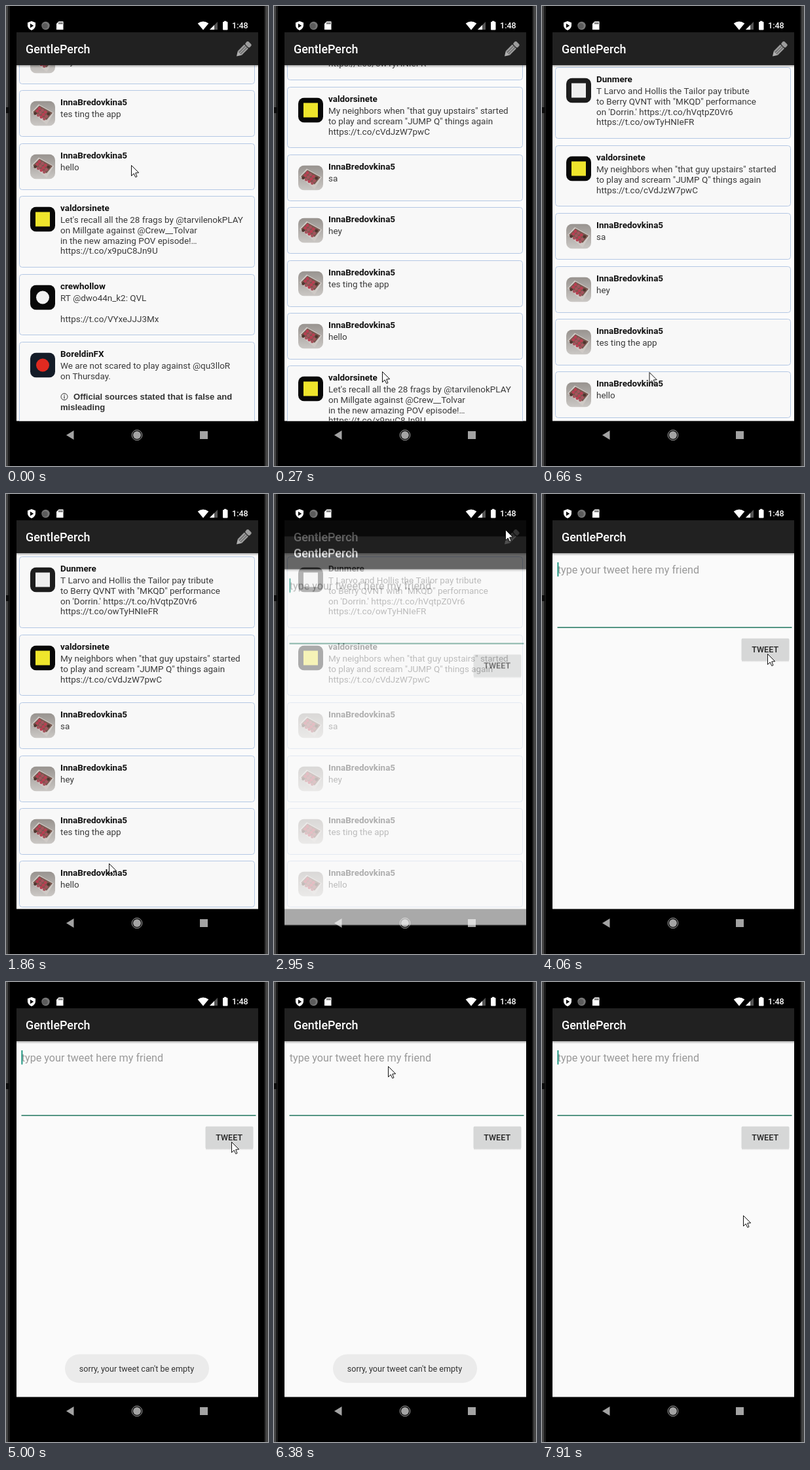
An HTML page with a canvas for the animation above (8 s loop, 400x700 px).

```html
<!DOCTYPE html>
<html lang="en">
<head>
<meta charset="utf-8">
<title>GentlePerch</title>
<style>
html, body { margin: 0; width: 100%; height: 100%; overflow: hidden; background: #000; }
canvas { display: block; width: 400px; height: 700px; }
</style>
</head>
<body>
<canvas id="stage"></canvas>
<script>
const W = 400, H = 700, LOOP = 8000;
const STEP = 135, OPEN = 2950, LEAVE = 5960;
const LINE = 15.8, GAP = 9.7;
const dpr = window.devicePixelRatio || 1;
const stage = document.getElementById('stage');
const sheet = document.createElement('canvas');
const main = prepare(stage), over = prepare(sheet);
let g = main;

// Pointer stops: time, x, y.
const STOPS = [[0, 191, 242], [270, 165, 556], [1755, 157, 562], [2280, 353, 42], [2550, 353, 54],
  [OPEN, 353, 54], [3900, 344, 243], [LEAVE, 344, 243], [6365, 174, 128], [6900, 307, 355]];

const ME = 'InnaBredovkina5', CLUB = 'valdorsinete';
const POSTS = [
  ['square', 'Dunmere', 'T Larvo and Hollis the Tailor pay tribute',
    'to Berry QVNT with "MKQD" performance', "on 'Dorrin.' https://t.co/hVqtpZ0Vr6",
    'https://t.co/owTyHNIeFR'],
  ['yellow', CLUB, 'My neighbors when "that guy upstairs" started',
    'to play and scream "JUMP Q" things again', 'https://t.co/cVdJzW7pwC'],
  ...['sa', 'hey', 'tes ting the app', 'hello'].map(line => ['photo', ME, line]),
  ['yellow', CLUB, "Let's recall all the 28 frags by @tarvilenokPLAY",
    'on Millgate against @Crew__Tolvar', 'in the new amazing POV episode!\u2026',
    'https://t.co/x9puC8Jn9U'],
  ['white', 'crewhollow', 'RT @dwo44n_k2: QVL', '', 'https://t.co/VYxeJJJ3Mx'],
  ['red', 'BoreldinFX', 'We are not scared to play against @qu3lloR', 'on Thursday.', '',
    '*Official sources stated that is false and', '*misleading']
];

function prepare(canvas) {
  canvas.width = W * dpr;
  canvas.height = H * dpr;
  const ctx = canvas.getContext('2d');
  ctx.scale(dpr, dpr);
  return ctx;
}

const ramp = (t, from, to) => Math.min(1, Math.max(0, (t - from) / (to - from)));
const pulse = (t, from, to) => Math.sin(Math.PI * ramp(t, from, to));

// The screen refreshes at a coarse, regular pace within each scene.
function snap(t) {
  const base = t < OPEN ? 0 : t < LEAVE ? OPEN : LEAVE;
  return base + Math.floor((t - base) / STEP) * STEP;
}

function rect(x, y, w, h, fill) {
  g.fillStyle = fill;
  g.fillRect(x, y, w, h);
}

function round(x, y, w, h, r, fill, stroke) {
  g.beginPath();
  g.roundRect(x, y, w, h, r);
  if (fill) { g.fillStyle = fill; g.fill(); }
  if (stroke) { g.strokeStyle = stroke; g.stroke(); }
}

function disc(x, y, r, fill) {
  g.beginPath();
  g.arc(x, y, r, 0, 7);
  g.fillStyle = fill;
  g.fill();
}

function ring(x, y, r, color) {
  g.beginPath();
  g.arc(x, y, r, 0, 7);
  g.lineWidth = 1;
  g.strokeStyle = color;
  g.stroke();
}

function poly(points, fill, stroke) {
  g.beginPath();
  for (let i = 0; i < points.length; i += 2) g.lineTo(points[i], points[i + 1]);
  g.closePath();
  g.fillStyle = fill;
  g.fill();
  if (stroke) { g.strokeStyle = stroke; g.stroke(); }
}

function text(str, x, y, size, color, weight = 400, family = 'Roboto') {
  g.font = `${weight} ${size}px ${family}, sans-serif`;
  g.fillStyle = color;
  g.fillText(str, x, y);
}

function fade(x, y, w, h, from, to) {
  const grad = g.createLinearGradient(0, y, 0, y + h);
  grad.addColorStop(0, from);
  grad.addColorStop(1, to);
  rect(x, y, w, h, grad);
}

function bezel() {
  rect(0, 0, W, H, '#000');
  rect(0, 0, 3, H, '#454545');
  rect(3, 0, 3, H, '#1a1a1a');
  rect(0, 154, 5, 9, '#0c0c0c');
  rect(394, 0, 2, H, '#1a1a1a');
  rect(396, 0, 4, H, '#454545');
}

function statusBar() {
  rect(16, 15, 369, 25, '#000');
  g.beginPath();
  g.moveTo(39, 23);
  g.lineTo(45, 25.3);
  g.lineTo(45, 30);
  g.quadraticCurveTo(44.5, 34.5, 39, 37);
  g.quadraticCurveTo(33.5, 34.5, 33, 30);
  g.lineTo(33, 25.3);
  g.fillStyle = '#fff';
  g.fill();
  poly([37, 26.8, 42.2, 30, 37, 33.2], '#000');
  disc(60.5, 30, 6.2, '#777');
  disc(59.5, 30.5, 4.3, '#5c5c5c');
  poly([80.5, 23.5, 87.5, 23.5, 87.5, 36, 77, 36, 77, 27], '#fff');
  for (let x = 80.5; x < 86; x += 2.2) rect(x, 25, 1.1, 2.6, '#000');
  g.beginPath();
  g.moveTo(301, 36.5);
  g.lineTo(292.7, 26.5);
  g.quadraticCurveTo(301, 20.5, 309.3, 26.5);
  g.fillStyle = '#fff';
  g.fill();
  poly([323, 24, 323, 36, 311, 36], '#555');
  poly([318, 29, 318, 36, 311, 36], '#fff');
  round(331, 24, 7.5, 12.5, 1, '#fff');
  rect(333, 22.8, 3.5, 2, '#fff');
  text('1:48', 345, 34.4, 12.57, '#fff', 500);
}

function navIcons() {
  const gray = '#a3a3a3';
  poly([92, 653, 103.5, 646, 103.5, 660], gray);
  disc(200, 653, 6, gray);
  ring(200, 653, 7.8, gray);
  rect(296, 647, 12, 12, gray);
}

function appBar() {
  rect(16, 40, 369, 50, '#212121');
  fade(16, 90, 369, 4, 'rgba(0,0,0,.3)', 'rgba(0,0,0,0)');
  text('GentlePerch', 30, 72.2, 17.96, '#fff', 500);
}

function pencil() {
  g.save();
  g.translate(352, 76.5);
  g.rotate(-Math.PI / 4);
  poly([0, 0, 7, -4.4, 7, 4.4], '#b0b0b0');
  rect(7, -4.4, 14, 8.8, '#9c9c9c');
  rect(7, -1.8, 14, 1, '#555');
  rect(7, 1.2, 14, 1, '#555');
  round(22.2, -4.6, 6.5, 9.2, 2, '#9c9c9c');
  g.restore();
}

function sweets(x, y) {
  fade(x, y, 38, 38, '#98938f', '#cbc8c5');
  poly([x + 2, y + 17, x + 13, y + 5, x + 36, y + 18, x + 25, y + 36], '#cfcac6');
  poly([x + 4, y + 17, x + 14, y + 7, x + 34, y + 18, x + 25, y + 29], '#77574e');
  for (let i = 0; i < 12; i++) {
    const col = i % 4, row = i >> 2;
    disc(x + 14 + col * 4.6 - row * 3.2, y + 11.5 + col * 2.7 + row * 3.8, 2.4,
      i % 5 === 3 ? '#51352f' : i % 2 ? '#a5525c' : '#b83f52');
  }
}

// Brand marks are a plain disc or square on their tile.
function avatar(kind, x, y) {
  g.save();
  g.beginPath();
  g.roundRect(x, y, 38, 38, 9);
  g.clip();
  if (kind === 'photo') {
    sweets(x, y);
  } else {
    rect(x, y, 38, 38, kind === 'red' ? '#141c28' : kind === 'square' ? '#1d1d1d' : '#080808');
    if (kind === 'yellow') rect(x + 8, y + 8, 22, 22, '#efe52c');
    if (kind === 'square') rect(x + 8, y + 8, 22, 22, '#eee');
    if (kind === 'white') disc(x + 19, y + 19, 10, '#f2f2f2');
    if (kind === 'red') disc(x + 19, y + 19, 10, '#e02a20');
  }
  g.restore();
}

function infoMark(x, y) {
  ring(x, y, 5, '#333');
  rect(x - .6, y - 1, 1.2, 4, '#333');
  rect(x - .6, y - 3, 1.2, 1.2, '#333');
}

function post([kind, name, ...lines], y, h) {
  g.lineWidth = 1;
  round(20.5, y + .5, 359, h - 1, 4, '#f8f8f8', '#b4c8e4');
  avatar(kind, 37, y + 16.5);
  text(name, 83, y + 23, 13.47, '#111', 700);
  let marked = false;
  lines.forEach((line, i) => {
    const base = y + 41 + i * LINE;
    if (line[0] !== '*') return text(line, 83, base, 13.47, '#3a3a3a');
    if (!marked) infoMark(89, base - 4.8);
    text(line.slice(1), marked ? 83 : 103, base, 13.05, '#333', 700, 'Liberation Sans');
    marked = true;
  });
}

function feed(t) {
  g.save();
  g.beginPath();
  g.rect(16, 90, 369, 541.5);
  g.clip();
  rect(16, 90, 369, 542, '#fbfbfb');
  let y = 95.2 - 349.5 * (1 - ramp(t, 0, 600)) ** 2.25;
  for (const p of POSTS) {
    const h = Math.max(70.6, 46 + (p.length - 2) * LINE);
    if (y < 632 && y + h > 90) post(p, Math.round(y), Math.round(h));
    y += h + GAP;
  }
  const glow = pulse(t, 540, 1700);
  g.beginPath();
  g.ellipse(200.5, 90, 215, 25 * glow, 0, 0, Math.PI);
  g.fillStyle = `rgba(33,33,33,${.08 * glow})`;
  g.fill();
  g.restore();
  appBar();
  pencil();
}

function composer(t) {
  rect(16, 40, 369, 591.5, '#fafafa');
  appBar();
  text('type your tweet here my friend', 23.7, 121, 16.16, '#999');
  if ((t + 130) % 1000 < 500) rect(23.5, 104, 1.8, 21.5, '#0f8f78');
  rect(23.5, 202.3, 358, 1.7, '#3a8571');
  fade(305, 253, 72, 3, 'rgba(0,0,0,.15)', 'rgba(0,0,0,0)');
  round(304.5, 219.7, 73, 34, 2, '#d6d7d7');
  round(304.5, 219.7, 73, 34, 2, `rgba(0,0,0,${.14 * pulse(t, 4200, 4800)})`);
  text('TWEET', 320.3, 241, 12.57, '#222', 500);
  g.save();
  g.globalAlpha = ramp(t, 4340, 4610) - ramp(t, 6400, 6650);
  round(90, 566.5, 220, 43.5, 21.7, '#ebebeb');
  text("sorry, your tweet can't be empty", 111.8, 593, 12.57, '#333');
  g.restore();
}

function pointer(t) {
  if (t > 2000 && t < 2280) return;
  const next = STOPS.findIndex(s => s[0] > t);
  const b = STOPS.at(next), a = next > 0 ? STOPS[next - 1] : b;
  const k = ramp(t, a[0], b[0]) || 0;
  g.save();
  g.translate(a[1] + (b[1] - a[1]) * k, a[2] + (b[2] - a[2]) * k);
  g.lineWidth = 1;
  poly([.5, .5, .5, 16.5, 4.2, 13, 6.8, 18.5, 9, 17.5, 6.7, 12, 11.7, 11.7], '#fff', '#111');
  g.restore();
}

function draw(t) {
  const held = snap(t);
  g = main;
  bezel();
  navIcons();
  if (t < OPEN + 400) feed(held);
  if (t >= OPEN) {
    g = over;
    g.clearRect(0, 0, W, H);
    rect(16, 15, 369, 25, '#000');
    composer(t);
    g = main;
    g.save();
    g.beginPath();
    g.rect(16, 40, 369, 640);
    g.clip();
    g.globalAlpha = .68 + .32 * ramp(held, OPEN, OPEN + 150);
    g.drawImage(sheet, 0, 24.5 * (1 - ramp(held, OPEN, OPEN + 260)) ** 3, W, H);
    g.restore();
  }
  statusBar();
  pointer(held);
}

function loop(now) {
  draw(now % LOOP);
  requestAnimationFrame(loop);
}
draw(0);
requestAnimationFrame(loop);
</script>
</body>
</html>
```
